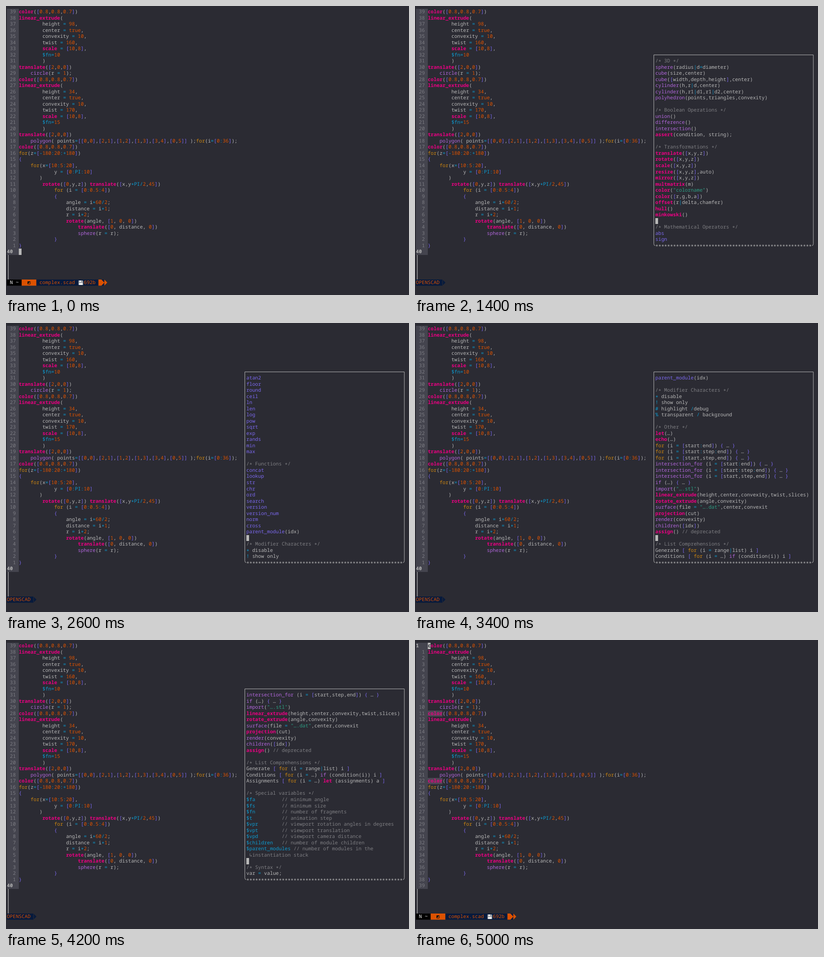
Recreate the animation shown at these times as an HTML page. Size 882 px wide and 635 px high, loop 5200 ms.

```html
<!DOCTYPE html>
<html lang="en">
<head>
<meta charset="utf-8">
<title>Editor with cheat sheet</title>
<style>
  html, body { margin: 0; width: 100%; height: 100%; overflow: hidden; background: #2b2b33; }
  #stage {
    --w: 6.46875px; --h: 13.52px;
    position: relative; width: 882px; height: 635px; overflow: hidden;
    background: #2b2b33; color: #b8b8b8;
    font: 10.78125px/13.52px "Noto Sans Mono", "DejaVu Sans Mono", monospace;
    font-variant-ligatures: none; text-rendering: geometricPrecision;
  }
  .row, .box {
    position: absolute; white-space: pre; height: var(--h);
    left: calc(2px + var(--c) * var(--w)); top: calc(6px + var(--r) * var(--h));
  }
  .row span { position: absolute; left: calc(var(--x) * var(--w)); top: 0; }
  .box { width: calc(var(--n) * var(--w)); }
  #cursor { background: #b8b8b8; color: #2b2b33; }
  .mark { background: #4d4654; }
  #gutter { position: absolute; left: 2px; top: 6px; width: 25.8px; height: 541px; background: #44444e; }
  #tail { position: absolute; left: 4px; top: 547px; width: 1.5px; height: 54px; background: #85858a; }
  svg { position: absolute; left: 0; top: 0; }
  i { font-style: normal; position: relative; top: 2px; }
  .num { color: #7d7d84; }
  .num.here { color: #b2b2b2; font-weight: bold; }
  .key { color: #ea0082; font-weight: bold; }
  .shape { color: #b267dc; }
  .fn, .bracket { color: #7b68ee; }
  .flow { color: #cf870f; }
  .lit { color: #dc5200; }
  .op { color: #0d9bd0; }
  .str { color: #2d9f84; }
  .note { color: #7f7f83; }
</style>
</head>
<body>
<div id="stage">
  <div id="gutter"></div>
  <div id="tail"></div>
  <div id="marks"></div>
  <div id="numbers"></div>
  <div id="code"></div>
  <div id="normal">
    <svg width="882" height="635">
      <path fill="#000" d="M2 601h32.3v13.5h-32.3z"/>
      <path fill="#dc5200" d="M34.3 601h32.3v13.5h-32.3z"/>
      <path fill="#071a3c" d="M66.6 601h148.6v13.5h-148.6z"/>
      <path fill="#dc5200" d="M202.3 601h6.5l6.5 6.75-6.5 6.75h-6.5zM215.2 601l6.5 6.75-6.5 6.75z"/>
      <path fill="none" stroke="#111" d="M47.5 605.5h5.5v5.5h-5.5z"/>
      <path fill="#111" d="M47.5 605.5h5.5l-5.5 5.5z"/>
      <path fill="#8f949c" d="M158.5 603h9l1.5 1.5v8.5h-10.5z"/>
      <path fill="#f2f2f2" d="M160.5 603h6v3.5h-6zM160 608.5h7.5v4.5h-7.5z"/>
      <path fill="#444a55" d="M164.5 603.5h1.3v2.3h-1.3z"/>
    </svg>
    <div class="row" style="--c:1;--r:44;color:#eee">N ~</div>
    <div class="row lit" style="--c:11;--r:44">complex.scad</div>
    <div class="row lit" style="--c:26;--r:44">692b</div>
  </div>
  <div id="popup">
    <svg width="882" height="635" fill="none" stroke="#b8b8b8">
      <path d="M525.7 526.5q-3 0-3-4V107.4H871.8V522.5q0 4-3 4"/>
      <path fill="#071a3c" stroke="none" d="M2 601h58.1l6.5 6.75-6.5 6.75h-58.1z"/>
      <path stroke="#2b2b33" d="M60.5 601v13.5"/>
    </svg>
    <div class="row lit" style="--c:0;--r:44">OPENSCAD</div>
    <div class="row" id="stars" style="--c:81;--r:38.15"></div>
    <div id="sheet"></div>
  </div>
  <div id="cursor" class="box" style="--n:1"></div>
</div>
<script>
const CODE = `color([0.8,0.8,0.7])
linear_extrude(
        height = 98,
        center = true,
        convexity = 10,
        twist = 160,
        scale = [10,8],
        $fn=10
        )
translate([2,0,0])
    circle(r = 1);
color([0.8,0.8,0.7])
linear_extrude(
        height = 34,
        center = true,
        convexity = 10,
        twist = 170,
        scale = [10,8],
        $fn=15
        )
translate([2,0,0])
    polygon( points=[[0,0],[2,1],[1,2],[1,3],[3,4],[0,5]] );for(i=[0:36]);
color([0.8,0.8,0.7])
for(z=[-180:20:+180])
{
    for(x=[10:5:20],
            y = [0:PI:10]
       )
        rotate([0,y,z]) translate([x,y*PI/2,45])
            for (i = [0:0.5:4])
            {
                angle = i*60/2;
                distance = i*1;
                r = i*2;
                rotate(angle, [1, 0, 0])
                    translate([0, distance, 0])
                    sphere(r = r);
            }
}
`.split("\n");

const MATH = "abs sign sin cos tan acos asin atan atan2 floor round ceil ln len log pow sqrt exp rands min max";
const FUNCS = "concat lookup str chr ord search version version_num norm cross parent_module";
const list = s => s.split(" ").join("\n");

const SHEET = `
/* 2D */
circle(radius|d=diameter)
square(size,center)
square([width,height],center)
polygon([points])
polygon([points],[paths])
text(t,size,font,
    halign,valign,spacing,
    direction,language,script)
/* 3D */
sphere(radius|d=diameter)
cube(size,center)
cube([width,depth,height],center)
cylinder(h,r|d,center)
cylinder(h,r1|d1,r1|d2,center)
polyhedron(points,triangles,convexity)

/* Boolean Operations */
union()
difference()
intersection()
assert(condition, string);

/* Transformations */
translate([x,y,z])
rotate([x,y,z])
scale([x,y,z])
resize([x,y,z],auto)
mirror([x,y,z])
multmatrix(m)
color("colorname")
color([r,g,b,a])
offset(r|delta,chamfer)
hull()
minkowski()

/* Mathematical Operators */
${list(MATH)}

/* Functions */
${list(FUNCS)}(idx)

/* Modifier Characters */
* disable
! show only
# highlight /debug
% transparent / background

/* Other */
let(…)
echo(…)
for (i = [start:end]) { … }
for (i = [start:step:end]) { … }
for (i = [start,step,end]) { … }
intersection_for (i = [start:end]) { … }
intersection_for (i = [start:step:end]) { … }
intersection_for (i = [start,step,end]) { … }
if (…) { … }
import("….stl")
linear_extrude(height,center,convexity,twist,slices)
rotate_extrude(angle,convexity)
surface(file = "….dat",center,convexit
projection(cut)
render(convexity)
children([idx])
assign() // deprecated

/* List Comprehensions */
Generate [ for (i = range|list) i ]
Conditions [ for (i = …) if (condition(i)) i ]
Assignments [ for (i = …) let (assignments) a ]

/* Special variables */
$fa         // minimum angle
$fs         // minimum size
$fn         // number of fragments
$t          // animation step
$vpr        // viewport rotation angles in degrees
$vpt        // viewport translation
$vpd        // viewport camera distance
$children   // number of module children
$parent_modules // number of modules in the
 ↳instantiation stack

/* Syntax */
var = value;
module name(…) { … }
name();
function name(…) = …
name();
include <….scad>
use <….scad>
`.split("\n");

const WORDS = {};
const define = (cls, words) => words.split(" ").forEach(w => WORDS[w] = cls);
define("key", "color linear_extrude scale translate rotate resize mirror multmatrix offset hull minkowski rotate_extrude projection assign let echo assert");
define("shape", "circle square polygon text sphere cube cylinder polyhedron union difference intersection intersection_for import surface render children if");
define("fn", MATH + " " + FUNCS);
define("flow", "for");
define("lit", "true");
define("op", "PI");

const TOKEN = /(\/\*.*?\*\/|\/\/.*|↳.*)|("[^"]*")|(\d+(?:\.\d+)?)|(\$\w+|[=:|*\/+<>!#%-])|([\[\]{}])|([A-Za-z_]\w*)|[^\s\w]/g;
const KINDS = ["note", "str", "lit", "op", "bracket"];
const markup = s => s.replace(/</g, "&lt;").replace(/\*/g, "<i>*</i>");

// every token sits on its own cell of the character grid
const paint = line => [...line.matchAll(TOKEN)].map(m => {
  const cls = KINDS[m.slice(1, 6).findIndex(Boolean)] || WORDS[m[0]] || "";
  return `<span class="${cls}" style="--x:${m.index}">${markup(m[0])}</span>`;
}).join("");
const row = (c, r, html, cls = "") => `<div class="row ${cls}" style="--c:${c};--r:${r}">${html}</div>`;
const $ = id => document.getElementById(id);

$("code").innerHTML = CODE.map((line, r) => row(4, r, paint(line))).join("");
$("marks").innerHTML = [11, 22].map(r => `<div class="box mark" style="--c:4;--r:${r};--n:5"></div>`).join("");
$("stars").textContent = "*".repeat(53);

// start time, first sheet line (null: popup closed), cursor line
const STEPS = [
  [0, null, 39], [200, 0, 0], [600, 0, 17], [1000, 0, 23],
  [1400, 10, 36], [1800, 30, 36], [2200, 30, 59], [2600, 46, 72],
  [3000, 53, 78], [3400, 71, 97], [3800, 78, 102], [4200, 87, 114],
  [4600, 94, 123], [5000, null, 0]
];
const LOOP = 5200;

function number(here) {
  $("numbers").innerHTML = CODE.map((_, r) => r === here
    ? row(0, r, r + 1, "num here")
    : row(0, r, String(Math.abs(r - here)).padStart(3), "num")).join("");
}

function show([, top, line]) {
  const open = top !== null;
  const first = !open && line === 0;
  const cursor = $("cursor");
  $("popup").hidden = !open;
  $("normal").hidden = open;
  $("marks").hidden = !first;
  number(first ? 0 : 39);
  if (open) {
    $("sheet").innerHTML = SHEET.slice(top, top + 30).map((s, r) => row(81, 8 + r, paint(s))).join("");
  }
  cursor.style.setProperty("--c", open ? 81 : 4);
  cursor.style.setProperty("--r", open ? 8 + line - top : line);
  cursor.innerHTML = first ? "<b>c</b>" : "";
}

let current;
function tick() {
  const t = performance.now() % LOOP;
  const step = STEPS.findLast(s => s[0] <= t);
  if (step !== current) show(current = step);
  requestAnimationFrame(tick);
}
tick();
</script>
</body>
</html>
```
